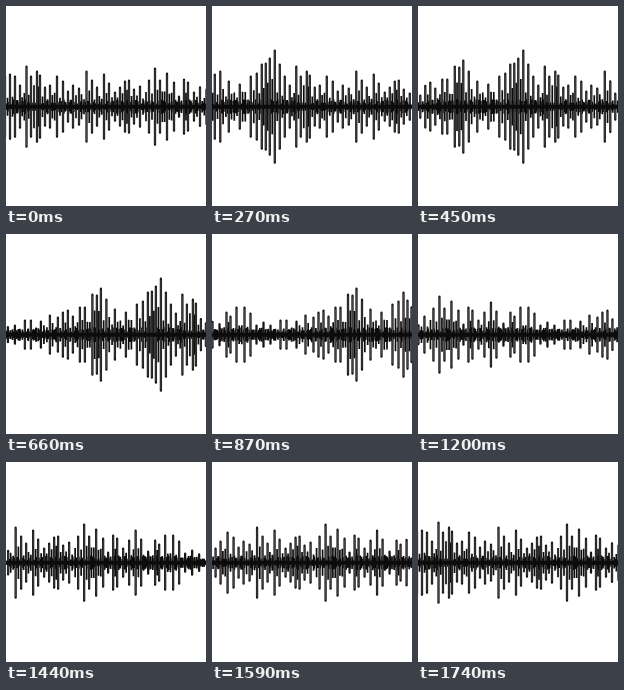
Animation of 200 by 200 pixels, one loop 1.77 s. Source, as an HTML page:

```html
<!DOCTYPE html>
<html lang="en">
<head>
<meta charset="utf-8">
<title>Sound wave</title>
<style>
  html, body { margin: 0; width: 100%; height: 100%; overflow: hidden; background: #fff; }
  svg { display: block; width: 100%; height: 100%; }
  path { fill: none; }
</style>
</head>
<body>
<svg viewBox="0 0 200 200">
  <path id="core" stroke="#0c0c0c" stroke-width="1.7"/>
  <path id="bars" stroke="#161616" stroke-width="2.3" stroke-linecap="round"/>
  <path id="shine" stroke="#555" stroke-width="0.7"/>
  <path d="M0 100.7H200" stroke="#0c0c0c" stroke-width="4"/>
</svg>
<script>
const PERIOD = 411, STEPS = 58, STEP_MS = 30, LOOP_MS = 1770, MID = 100.7;

// Tall bars of the strip: position, half height.
const peaks = [
  [4, 43], [9, 31], [14, 22], [20.5, 41], [25, 31], [31, 36], [34, 32], [39, 20], [44, 22],
  [51, 31], [57, 26], [62, 16], [67, 22], [73, 19], [80.5, 36], [86, 27], [91, 20], [98, 33],
  [103, 24], [109, 15], [114, 20], [119, 26], [123, 27], [128, 18], [134, 21], [143, 27],
  [149, 39], [154, 27], [161, 34], [168, 25], [173, 11], [178, 28], [182, 25], [188, 15],
  [194, 23], [200.5, 33], [206, 24], [213, 12], [220, 23], [224, 19], [230, 28], [238, 28],
  [244, 22], [250, 10], [257, 13], [264, 10], [274, 15], [280, 15], [290, 14], [299, 20],
  [307, 18], [312, 23], [317, 25], [322, 19], [329, 28], [334, 28], [341.5, 41], [346, 40],
  [350, 47], [355.5, 36], [364, 26], [375, 23], [386, 31], [392, 34], [397, 43], [401, 44],
  [405, 49], [410, 57]
];

// Repeatable noise in 0..1
const noise = n => {
  const v = Math.sin(n * 127.1 + 3.7) * 43758.5453;
  return v - Math.floor(v);
};

// Shorter bars fill the gaps between neighbouring peaks.
const fillers = peaks.flatMap(([x, h], i) => {
  const [nextX, nextH] = i + 1 < peaks.length ? peaks[i + 1] : [PERIOD + peaks[0][0], peaks[0][1]];
  const gap = nextX - x, count = Math.max(1, Math.round(gap / 2.6) - 1);
  return Array.from({ length: count }, (_, k) =>
    [x + gap * (k + 1) / (count + 1), Math.min(h, nextH) * (0.3 + 0.4 * noise(i * 5 + k))]);
});

const ripple = Array.from({ length: 206 }, (_, i) => [i * PERIOD / 206, 3 + 4.5 * noise(i + 500)]);

const wrap = x => ((x + 5) % PERIOD + PERIOD) % PERIOD - 5;
const taper = x => Math.min(1, 0.55 + 0.055 * Math.max(0, Math.min(x, 200 - x)));

function trace(bars, shift, trim = 0) {
  let d = "";
  for (const [pos, height] of bars) {
    const x = wrap(pos + shift);
    if (x > 205) continue;
    const h = height * taper(x) - trim;
    if (h > 0) d += `M${x.toFixed(2)} ${(MID - h).toFixed(2)}V${(MID + h).toFixed(2)}`;
  }
  return d;
}

const draw = (id, d) => document.getElementById(id).setAttribute("d", d);

function render(ms) {
  const step = Math.floor(ms % LOOP_MS / STEP_MS) % STEPS;
  const shift = step * PERIOD / STEPS;
  draw("core", trace(fillers.concat(ripple), shift));
  draw("bars", trace(peaks, shift, 1));
  draw("shine", trace(peaks.filter(p => p[1] > 14), shift, 2));
}

const start = performance.now();
function tick() {
  render(performance.now() - start);
  requestAnimationFrame(tick);
}
tick();
</script>
</body>
</html>
```
